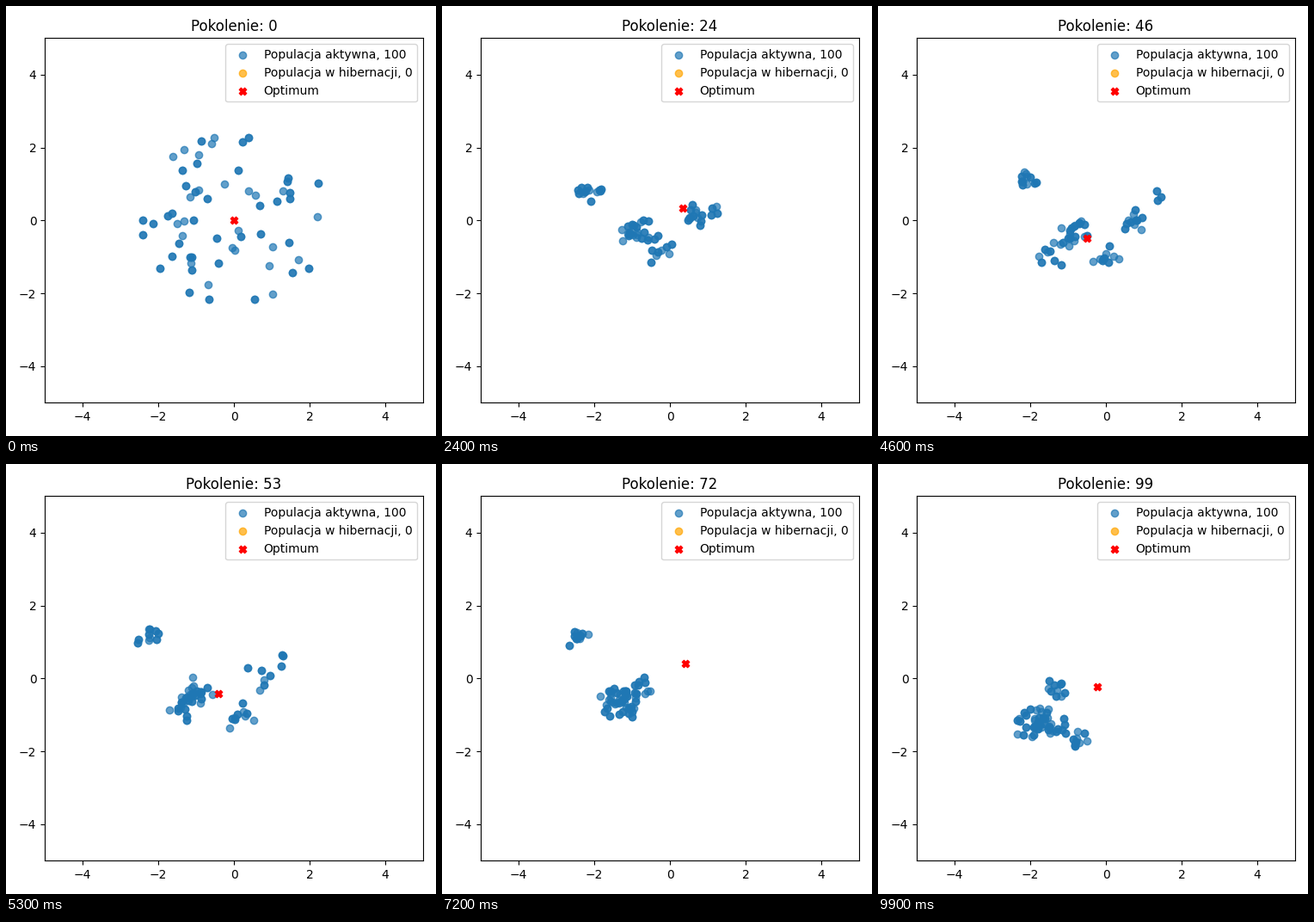
Write a matplotlib script that moves like this. It is 500 px wide and 500 px high and loops after 10 s.

```python
from collections import namedtuple

import numpy as np
import matplotlib.pyplot as plt
from matplotlib.animation import FuncAnimation

SIZE = 100          # population size
LINES = 62          # distinct individuals, the rest are clones
GENERATIONS = 100
MUTATION = 0.3      # chance that an individual changes in one generation

# A niche attracts part of the population while it lives;
# its centre follows the path of (generation, x, y) waypoints.
Niche = namedtuple("Niche", "birth death share spread path")
NICHES = [
    Niche(-9, 76, 9, (0.17, 0.15),
          [(12, -2.4, 0.7), (24, -2.1, 0.8), (46, -2.05, 1.1), (61, -2.4, 1.2)]),
    Niche(-9, 110, 24, (0.25, 0.2),
          [(12, -0.6, -0.5), (24, -0.8, -0.35), (46, -1.0, -0.3),
           (61, -1.3, -0.6), (84, -1.55, -0.65), (99, -1.85, -1.2)]),
    Niche(-9, 72, 11, (0.22, 0.22),
          [(12, -0.35, -0.8), (24, -0.2, -0.8), (46, 0.1, -0.9), (61, 0.35, -0.95)]),
    Niche(-9, 56, 16, (0.15, 0.17),
          [(12, 0.65, 0.2), (24, 0.65, 0.1), (46, 0.65, 0.0)]),
    Niche(-9, 70, 5, (0.1, 0.13),
          [(12, 0.95, 0.7), (24, 1.1, 0.4), (46, 1.4, 0.7), (61, 1.1, 0.5)]),
    Niche(-9, 20, 9, (0.17, 0.2), [(12, -0.55, 0.35)]),
    Niche(34, 110, 13, (0.17, 0.18),
          [(46, -1.45, -0.85), (61, -1.25, -0.7), (84, -1.1, -1.05), (99, -1.4, -1.35)]),
    Niche(50, 110, 8, (0.25, 0.12),
          [(61, -0.75, -0.2), (84, -0.7, -0.2), (99, -1.25, -0.3)]),
    Niche(72, 110, 8, (0.14, 0.1), [(84, -0.95, -1.55), (99, -0.7, -1.65)]),
]
SPREAD = np.array([n.spread for n in NICHES])


def centre(niche, gen):
    gens, xs, ys = zip(*niche.path)
    return np.interp(gen, gens, xs), np.interp(gen, gens, ys)


def weight(niche, gen):
    """Share of the niche, fading in and out over a few generations."""
    fade = min(gen - niche.birth, niche.death - gen) / 6
    return niche.share * np.clip(fade, 1e-9, 1)


def evolve(seed=4):
    """Positions of all individuals for every generation."""
    rng = np.random.default_rng(seed)
    radius = 2.5 * rng.random(LINES) ** 0.65
    angle = rng.uniform(0, 2 * np.pi, LINES)
    start = np.column_stack([radius * np.cos(angle), 0.95 * radius * np.sin(angle)])
    settle = rng.uniform(1, 10, LINES)
    taste = rng.gumbel(size=(LINES, len(NICHES)))
    offset = rng.normal(size=(LINES, 2))
    clones = np.arange(SIZE) % LINES
    history = []
    for gen in range(GENERATIONS):
        mutated = rng.random((LINES, 1)) < MUTATION
        step = 0.8 * offset + 0.6 * rng.normal(size=(LINES, 2))
        offset = np.where(mutated, step, offset).clip(-2, 2)
        pull = np.log([weight(n, gen) for n in NICHES])
        home = np.argmax(taste + pull, axis=1)
        centres = np.array([centre(n, gen) for n in NICHES])
        settled = centres[home] + SPREAD[home] * offset
        pos = np.where((gen > settle)[:, None], settled, start)
        history.append(pos[clones])
    return history


HISTORY = evolve()

fig, ax = plt.subplots(figsize=(5, 5), dpi=100)
ax.set(xlim=(-5, 5), ylim=(-5, 5))
title = ax.set_title("Pokolenie: 0")
active = ax.scatter(*HISTORY[0].T, color="tab:blue", alpha=0.7,
                    label=f"Populacja aktywna, {SIZE}")
ax.scatter([], [], color="orange", alpha=0.7, label="Populacja w hibernacji, 0")
optimum = ax.scatter([0], [0], color="red", marker="X", label="Optimum")
ax.legend(loc="upper right")
fig.tight_layout()


def update(gen):
    title.set_text(f"Pokolenie: {gen}")
    active.set_offsets(HISTORY[gen])
    optimum.set_offsets([[0.5 * np.sin(0.1 * gen)] * 2])
    return title, active, optimum


anim = FuncAnimation(fig, update, frames=GENERATIONS, interval=100,
                     repeat=True, repeat_delay=0)
plt.show()
```
